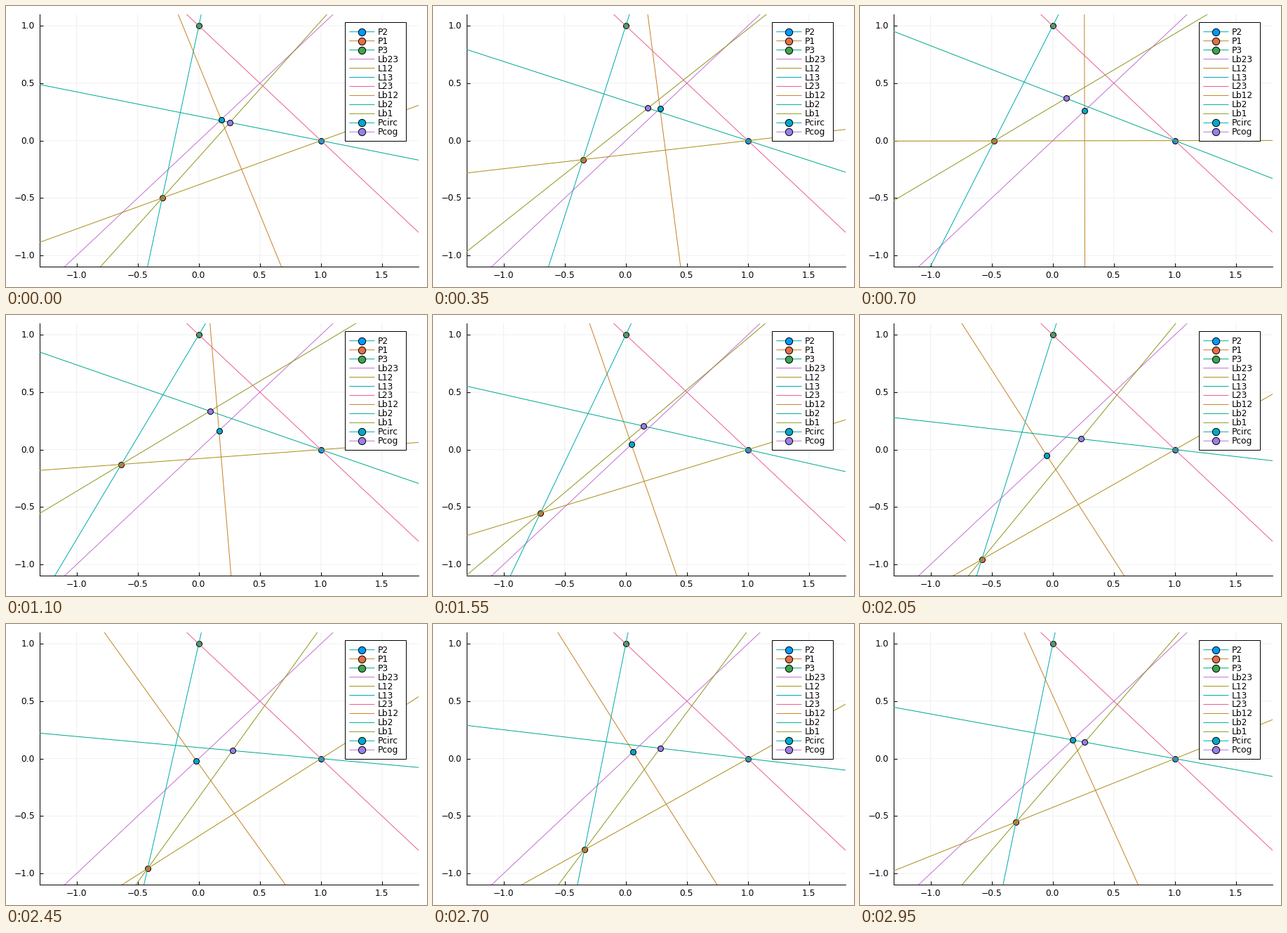
Animation, 600 px wide and 400 px high, one loop 3 s. Source, as a matplotlib script:

```python
import numpy as np
import matplotlib.pyplot as plt
from matplotlib.animation import FuncAnimation
from matplotlib.patches import Rectangle

W, H, DPI = 600, 400, 100
PX = 72 / DPI  # points per pixel
FRAMES, INTERVAL = 60, 50
XLIM, YLIM = (-1.3, 1.8), (-1.1, 1.1)
LEFT, RIGHT, TOP, BOTTOM = 48.4, 588.2, 11.8, 371.45
FONT = dict(family="DejaVu Sans", fontsize=12.2 * PX, color="black")

P2, P3 = np.array([1.0, 0.0]), np.array([0.0, 1.0])

BLUE, ORANGE, GREEN, PURPLE = "#009afa", "#e36f47", "#3ea44e", "#c371d2"
GOLD, TEAL, PINK, AMBER = "#ac8e18", "#00aaae", "#ed5e93", "#c68225"
SEA, OLIVE, CYAN, VIOLET = "#00a98d", "#8e971e", "#00a9cc", "#9b7fe9"

fig = plt.figure(figsize=(W / DPI, H / DPI), dpi=DPI, facecolor="white")
ax = fig.add_axes([LEFT / W, 1 - BOTTOM / H, (RIGHT - LEFT) / W, (BOTTOM - TOP) / H])
ax.set(xlim=XLIM, ylim=YLIM, xticks=np.arange(-1, 1.6, 0.5), yticks=np.arange(-1, 1.1, 0.5))
ax.set_axisbelow(True)
ax.grid(color="#f0f0f0", lw=PX, snap=False)
ax.tick_params(direction="in", length=5 * PX, width=PX,
               labelleft=False, labelbottom=False)
plt.setp(ax.get_xticklines() + ax.get_yticklines(), snap=False)
for side, spine in ax.spines.items():
    spine.set_visible(side in ("left", "bottom"))
    spine.set_linewidth(PX)

# Overlay in pixel units for labels and legend
page = fig.add_axes([0, 0, 1, 1], zorder=5)
page.set(xlim=(0, W), ylim=(H, 0))
page.axis("off")


def label(x, y, text, ha):
    page.text(x, y + 4, text, ha=ha, va="baseline", **FONT)


def number(v):
    return f"{v:.1f}".replace("-", "\u2212")


def dot(target, x, y, color, size, z):
    return target.plot([x], [y], "o", ms=size * PX, mfc=color, mec="black",
                       mew=PX, zorder=z, snap=False)[0]


for v in ax.get_xticks():
    x = LEFT + (v - XLIM[0]) / (XLIM[1] - XLIM[0]) * (RIGHT - LEFT)
    label(x - 0.4, 383, number(v), "center")
for v in ax.get_yticks():
    y = BOTTOM - (v - YLIM[0]) / (YLIM[1] - YLIM[0]) * (BOTTOM - TOP)
    label(41, y, number(v), "right")

# name, line colour, marker colour
LEGEND = [
    ("P2", TEAL, BLUE),
    ("P1", AMBER, ORANGE),
    ("P3", SEA, GREEN),
    ("Lb23", PURPLE, None),
    ("L12", GOLD, None),
    ("L13", TEAL, None),
    ("L23", PINK, None),
    ("Lb12", AMBER, None),
    ("Lb2", SEA, None),
    ("Lb1", OLIVE, None),
    ("Pcirc", TEAL, CYAN),
    ("Pcog", PURPLE, VIOLET),
]
page.add_patch(Rectangle((483, 23), 87, 169, fc="white", ec="black", lw=PX))
for i, (name, line_color, fill) in enumerate(LEGEND):
    y = 36.7 + 12.96 * i
    page.plot([489.3, 525.4], [y, y], color=line_color, lw=PX, zorder=2,
              solid_capstyle="butt", snap=False)
    if fill:
        dot(page, 507.2, y, fill, 10.3, 3)
    label(530, y, name, "left")


def line(color, z):
    return ax.plot([], [], color=color, lw=PX, zorder=z, snap=False)[0]


def set_line(artist, point, direction):
    d = 10 * direction / np.hypot(*direction)
    a, b = point - d, point + d
    artist.set_data([a[0], b[0]], [a[1], b[1]])


def unit(v):
    return v / np.hypot(*v)


dot(ax, *P2, BLUE, 8, 3)
p1_dot = dot(ax, 0, 0, ORANGE, 8, 3.1)
dot(ax, *P3, GREEN, 8, 3.2)
lb23 = line(PURPLE, 4.0)
l12 = line(GOLD, 4.1)
l13 = line(TEAL, 4.2)
l23 = line(PINK, 4.3)
lb12 = line(AMBER, 4.4)
lb2 = line(SEA, 4.5)
lb1 = line(OLIVE, 4.6)
circ_dot = dot(ax, 0, 0, CYAN, 8, 5)
incenter_dot = dot(ax, 0, 0, VIOLET, 8, 5.1)

set_line(l23, P2, P3 - P2)
set_line(lb23, (P2 + P3) / 2, np.array([1.0, 1.0]))


def update(i):
    t = 2 * np.pi * i / FRAMES
    p1 = np.array([-0.5 + 0.2 * np.cos(t), -0.5 + 0.5 * np.sin(t)])
    to2, to3 = P2 - p1, P3 - p1

    set_line(l12, p1, to2)
    set_line(l13, p1, to3)
    set_line(lb12, (p1 + P2) / 2, np.array([-to2[1], to2[0]]))
    set_line(lb1, p1, unit(to2) + unit(to3))
    set_line(lb2, P2, unit(-to2) + unit(P3 - P2))

    # Circumcentre lies on y = x
    c = (p1 @ p1 - 1) / (2 * (p1.sum() - 1))
    # Incentre: vertices weighted by opposite side lengths
    a, b, d = np.hypot(*(P3 - P2)), np.hypot(*to3), np.hypot(*to2)
    inc = (a * p1 + b * P2 + d * P3) / (a + b + d)

    p1_dot.set_data([p1[0]], [p1[1]])
    circ_dot.set_data([c], [c])
    incenter_dot.set_data([inc[0]], [inc[1]])
    return p1_dot, l12, l13, lb12, lb2, lb1, circ_dot, incenter_dot


anim = FuncAnimation(fig, update, frames=FRAMES, interval=INTERVAL,
                     repeat=True, repeat_delay=0, blit=False)
plt.show()
```
